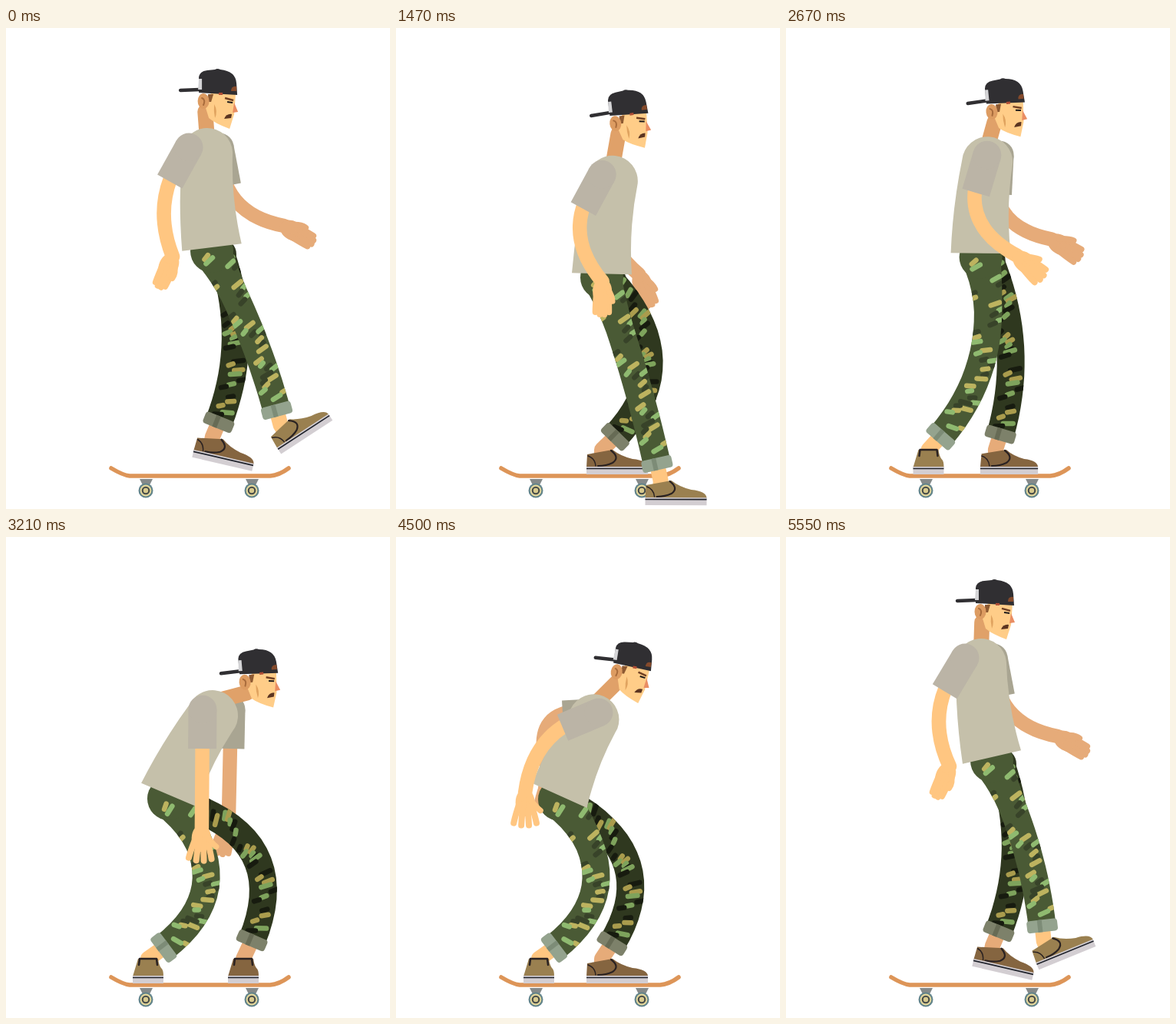
An HTML page that plays this animation: 500 by 625 pixels, repeating every 5580 ms.

```html
<!DOCTYPE html>
<html lang="en">
<head>
<meta charset="utf-8">
<title>Skater</title>
<style>
  html, body { margin: 0; width: 100%; height: 100%; overflow: hidden; background: #fff; }
  svg { display: block; width: 100vw; height: 100vh; }
</style>
</head>
<body>
<svg id="stage" viewBox="0 0 500 625"></svg>
<script>
const LOOP = 5580, STRIDE = 1150, JUMP = 2200;

// Two equal pushes, then the trick.
const track = (push, trick) => [
  ...push,
  ...push.map(([t, ...v]) => [t + STRIDE, ...v]).filter(k => k[0] < JUMP),
  ...trick
];

// time, hip x y, hem tilt, chest x y
const body = track([
  [0, 268, 290, -7, 262, 163],
  [350, 268, 325, 2, 283, 199],
  [520, 262, 321, 4, 286, 194],
  [810, 261, 292, 5, 273, 168],
  [980, 263, 315, 0, 269, 189]
], [
  [2600, 255, 297, 0, 262, 172],
  [2880, 248, 305, 6, 265, 185],
  [3210, 212, 340, 23, 269, 232],
  [3400, 210, 344, 23, 268, 238],
  [3850, 217, 262, 14, 268, 165],
  [4020, 218, 214, 9, 262, 112],
  [4150, 222, 192, 5, 255, 85],
  [4500, 213, 341, 24, 258, 236],
  [4900, 240, 310, 8, 262, 192],
  [5130, 258, 296, -2, 262, 172],
  [5550, 268, 291, -13, 254, 165]
]);

// time, x y, tilt
const head = track([
  [0, 275, 95, 0],
  [430, 309, 127, -10],
  [730, 297, 92, -16],
  [810, 294, 96, -14],
  [980, 293, 118, -8]
], [
  [2600, 285, 106, -6],
  [2880, 295, 119, -5],
  [3210, 329, 187, -5],
  [3400, 328, 193, 0],
  [3850, 333, 130, 25],
  [4020, 328, 89, 45],
  [4150, 318, 60, 40],
  [4500, 305, 178, 9],
  [4900, 290, 130, 3],
  [5550, 271, 97, 0]
]);

// time, ankle x y, angle, turn to viewer, knee bend
const nearFoot = track([
  [0, 357, 516, -33, 0, 8],
  [110, 399, 497, -38, 0, 5],
  [320, 345, 588, 0, 0, 5],
  [590, 160, 562, 40, 0, 10],
  [690, 102, 478, 105, 0, 30],
  [810, 162, 420, 133, 0, 90],
  [980, 207, 470, 58, 0, 87],
  [1070, 280, 505, 8, 0, 55]
], [
  [2450, 186, 548, 0, 1, 30],
  [3210, 185, 548, 0, 1, 62],
  [3600, 185, 548, 0, 1, 55],
  [4020, 129, 428, 81, 0, 57],
  [4150, 112, 392, 85, 0, 62],
  [4420, 186, 548, 0, 1, 60],
  [4600, 186, 548, 0, 1, 62],
  [5170, 186, 548, 0, 1, 20],
  [5400, 245, 527, 5, 0, 45],
  [5550, 335, 525, -22, 0, 12]
]);

const farFoot = track([
  [0, 269, 531, 13, 0, 24],
  [300, 268, 548, 0, 0, 55],
  [500, 268, 548, 0, 0, 58],
  [810, 268, 548, 0, 0, 16],
  [980, 268, 548, 0, 0, 59]
], [
  [2600, 268, 548, 0, 0, 22],
  [2930, 309, 548, 0, 1, 40],
  [3210, 309, 548, 0, 1, 66],
  [3600, 309, 548, 0, 1, 50],
  [4020, 394, 402, -27, 1, 40],
  [4150, 422, 372, -26, 1, 42],
  [4420, 268, 548, 0, 0, 58],
  [4600, 268, 548, 0, 0, 58],
  [5170, 268, 548, 0, 0, 22],
  [5550, 269, 531, 13, 0, 24]
]);

// time, shoulder x and wrist x y from the chest, hand angle, finger spread
const nearArm = track([
  [0, -24, -45, 134, 114, 0],
  [400, -10, 0, 130, 80, .3],
  [650, 6, 85, 100, -15, .6],
  [810, 6, 69, 114, -5, .6],
  [980, -6, -7, 124, 60, 0]
], [
  [2600, 0, 40, 122, 40, .4],
  [3210, -13, -14, 146, 93, .9],
  [3400, -10, -50, 130, 110, .8],
  [3700, 0, -125, 40, 160, .9],
  [4020, 6, -122, -30, 200, 1.1],
  [4150, 6, -128, -38, 205, 1.1],
  [4500, 6, -90, 96, 90, .9],
  [5130, -18, -50, 132, 110, .1],
  [5550, -21, -41, 133, 114, 0]
]);

const farArm = track([
  [0, 16, 100, 94, 30, .1],
  [400, 0, 10, 125, 85, .3],
  [650, -11, -100, 75, 150, .5],
  [810, -11, -92, 87, 145, .5],
  [980, -14, -63, 123, 140, .4]
], [
  [2600, 14, 85, 100, 30, .3],
  [3210, 24, 21, 138, 105, .4],
  [3400, 20, -30, 135, 115, .5],
  [3700, 10, -122, 50, 155, .9],
  [4020, 6, -124, -9, 175, 1],
  [4150, 6, -126, -15, 180, 1],
  [4500, 10, -58, 74, 100, .4],
  [5200, 14, 80, 105, 40, .2],
  [5550, 16, 100, 94, 30, .1]
]);

// time, centre x y, pitch, roll
const board = [
  [0, 252, 582, 0, 0],
  [3440, 252, 582, 0, 0],
  [3600, 250, 560, -14, 0],
  [4020, 249, 520, -15, 180],
  [4180, 250, 528, -9, 270],
  [4400, 252, 582, 0, 360],
  [4410, 252, 582, 0, 0]
];

// Cyclic cubic interpolation that never overshoots a key.
function at(keys, time) {
  const n = keys.length, around = [-1, 0, 1, 2];
  const i = keys.findLastIndex(k => k[0] <= time);
  const k = around.map(o => keys[(i + o + n) % n]);
  const t = around.map((o, j) => k[j][0] + LOOP * Math.floor((i + o) / n));
  const span = t[2] - t[1], u = (time - t[1]) / span;
  return k[1].slice(1).map((_, c) => {
    const v = k.map(key => key[c + 1]);
    const d = [0, 1, 2].map(j => (v[j + 1] - v[j]) / (t[j + 1] - t[j]));
    const slope = (a, b) => a * b <= 0 ? 0 : 2 * a * b / (a + b) * span;
    const m0 = slope(d[0], d[1]), m1 = slope(d[1], d[2]), D = v[2] - v[1];
    return v[1] + u * (m0 + u * (3 * D - 2 * m0 - m1 + u * (m0 + m1 - 2 * D)));
  });
}

const P = (x, y) => ({ x, y, toString: () => x.toFixed(1) + ' ' + y.toFixed(1) });
const mix = (a, b, u) => a + (b - a) * u;
const degrees = (a, b) => Math.atan2(b.y - a.y, b.x - a.x) * 180 / Math.PI;
const polar = (p, deg, r) => P(p.x + r * Math.cos(deg * Math.PI / 180), p.y + r * Math.sin(deg * Math.PI / 180));
const fill = (d, color) => `<path d="${d}" fill="${color}"/>`;
const line = (d, color, width, cap = 'round') =>
  `<path d="${d}" fill="none" stroke="${color}" stroke-width="${width}" stroke-linecap="${cap}" stroke-linejoin="round"/>`;
const circle = (p, r, color) => `<circle cx="${p.x}" cy="${p.y}" r="${r}" fill="${color}"/>`;
const group = (p, deg, inner, extra = '') => `<g transform="translate(${p}) rotate(${deg}) ${extra}">${inner}</g>`;

// Quadratic limb from a to b, bowed sideways by sag.
function limb(a, b, sag) {
  const dx = b.x - a.x, dy = b.y - a.y, c = Math.hypot(dx, dy);
  const k = P((a.x + b.x) / 2 + 2 * sag * dy / c, (a.y + b.y) / 2 - 2 * sag * dx / c);
  const point = (t, off = 0) => {
    const q = s => (1 - t) ** 2 * a[s] + 2 * t * (1 - t) * k[s] + t * t * b[s];
    const g = s => (1 - t) * (k[s] - a[s]) + t * (b[s] - k[s]);
    const l = Math.hypot(g('x'), g('y'));
    return P(q('x') + off * g('y') / l, q('y') - off * g('x') / l);
  };
  return { point, d: `M${a}Q${k} ${b}` };
}

function camo(seed) {
  const rnd = () => (seed = seed * 16807 % 2147483647) / 2147483647;
  return Array.from({ length: 13 }, (_, i) => {
    const t = .02 + i * .067 + rnd() * .03, off = (rnd() - .5) * 30;
    return [0, 1, 2].slice(0, 2 + (rnd() > .6)).map(j => ({
      t: t + j * .024, off: off + (rnd() - .5) * 16, len: 4 + rnd() * 9, color: (i + j) % 3
    }));
  }).flat();
}

const near = {
  id: 'near', skin: '#ffc681', sleeve: '#bbb4a6', pants: '#4a5a35', cuff: '#94a38e', fold: '#7d8c77', shoe: '#9a8050',
  hip: 28, reach: 154, camo: camo(421), camoColors: ['#bdb35f', '#8fba70', '#384329']
};
const far = {
  id: 'far', skin: '#e6ab79', sleeve: '#a9a592', pants: '#2f381f', cuff: '#7d816a', fold: '#676b55', shoe: '#856540',
  hip: 20, reach: 146, camo: camo(977), camoColors: ['#aa9c4d', '#7ea35c', '#171b0f']
};

function shoe(turn, color) {
  const m = (a, b) => mix(a, b, turn).toFixed(1), toe = m(60, 20), ink = '#2a2222';
  const trim = turn > .5
    ? line('M-12 8L-11 0H11L12 8', ink, 2.5)
    : line('M12 1Q24 10 14 17Q6 21 -5 21', ink, 2.2) + line('M-18 8Q-9 11 -8 21', ink, 1.5);
  return fill(`M-20 23L${m(-19, -13)} ${m(6, 0)}L${m(14, 13)} 0Q${m(24, 14)} 8 ${m(40, 17)} 12Q${toe} 14 ${toe} 23Z`, color)
    + trim + fill(`M-20 22H${toe}V32H-20Z`, '#d3ced2') + line(`M-20 24.5H${toe}`, '#20232c', 1.6, 'butt');
}

function leg(hip, [x, y, angle, turn, sag], look) {
  const ankle = P(x, y), curve = limb(hip, ankle, sag), end = .92;
  const width = t => 18 + (look.hip - 20) * Math.max(0, 1 - t / .3) ** 2;
  const steps = Array.from({ length: 19 }, (_, i) => i / 18 * end);
  const side = s => steps.map(t => curve.point(t, s * width(t)));
  const shape = `<path d="M${[...side(1), ...side(-1).reverse()].join('L')}Z"/>`
    + `<circle cx="${hip.x}" cy="${hip.y}" r="${look.hip}"/>`;
  const patches = look.camo.map(c => {
    const a = curve.point(c.t, c.off - c.len / 2), b = curve.point(c.t - .012, c.off + c.len / 2);
    return line(`M${a}L${b}`, look.camoColors[c.color], 6.5);
  }).join('');
  const p = curve.point(end), tilt = degrees(p, curve.point(end + .02)) - 90;
  return line(`M${p}L${ankle}L${polar(ankle, angle + 90, 5)}`, look.skin, 20, 'butt')
    + group(ankle, angle, shoe(turn, look.shoe))
    + `<clipPath id="${look.id}">${shape}</clipPath><g fill="${look.pants}">${shape}</g>`
    + `<g clip-path="url(#${look.id})">${patches}</g>`
    + group(p, tilt, `<rect x="-20" y="-8" width="40" height="16" rx="4" fill="${look.cuff}"/>`
      + `<rect x="-6" y="-8" width="6" height="16" fill="${look.fold}"/>`);
}

function hand(spread, skin) {
  const fingers = [-1.5, -.5, .5, 1.5].map(i =>
    line(`M14 ${i * 5}Q30 ${i * (5 + spread * 4)} ${44 - Math.abs(i) * 3} ${i * (4.5 + spread * 6)}`, skin, 8)).join('');
  return `<ellipse cx="13" cy="0" rx="18" ry="12.5" fill="${skin}"/>` + fingers
    + line(`M8 -6Q18 -13 ${26 - spread * 3} ${-11 - spread * 10}`, skin, 7.5);
}

function arm(chest, [sx, wx, wy, angle, spread], look) {
  const shoulder = P(chest.x + sx, chest.y - 8), wrist = P(chest.x + wx, chest.y + wy);
  const slack = look.reach - Math.hypot(wx - sx, wy + 8);
  const curve = limb(shoulder, wrist, -Math.min(44, Math.max(0, slack * 2)));
  const sleeveEnd = polar(shoulder, degrees(shoulder, curve.point(.35)), 51);
  return line(curve.d, look.skin, 18.5) + group(wrist, angle, hand(spread, look.skin))
    + line(`M${shoulder}L${sleeveEnd}`, look.sleeve, 37, 'butt') + circle(shoulder, 18.5, look.sleeve);
}

function shirt(hip, tilt, chest) {
  const hem = P(hip.x, hip.y - 5), left = polar(hem, tilt, -39), right = polar(hem, tilt, 39);
  const across = degrees(hip, chest) + 90;
  const a = polar(chest, across, -33), b = polar(chest, across, 33);
  const middle = (p, q, push) => polar(P((p.x + q.x) / 2, (p.y + q.y) / 2), across, push);
  return fill(`M${left}Q${middle(left, a, -5)} ${a}A33 33 0 0 1 ${b}Q${middle(b, right, -8)} ${right}Z`, '#c5c0aa');
}

const face =
  fill('M267 84H299L298 98L297 112L291 131Q272 124 264 117L260 104Z', '#ffcd88')
  + fill('M297 97L302 109L295 110Z', '#e98d63')
  + fill('M263 86H270L267 96H263Z', '#8d5a32')
  + '<ellipse cx="257" cy="95" rx="7.5" ry="10" fill="#dd9c62"/>'
  + line('M255 91Q260 93 257 100', '#a96c3c', 2)
  + fill('M271 99Q276 108 272 117Q270 108 271 99Z', '#e0a35f')
  + line('M285 91L296 94', '#704124', 2.5, 'butt') + line('M288 96L295 97', '#1d1a1a', 2, 'butt')
  + fill('M284 118Q287 111 294 112L293 117Z', '#5b3521')
  + fill('M251 84L251 64Q252 56 262 55L272 54Q275 52 279 54Q299 56 300 72L301 87Z', '#302f32')
  + line('M227 81L252 80', '#302f32', 4.5)
  + fill('M251 66H255V80H250Z', '#d4d4d6')
  + fill('M293 82Q293 75 300 76V82Z', '#854a2b')
  + fill('M277 84H282V87H277Z', '#b04e35');

const wheel = x => fill(`M${x - 8} 4H${x + 9}L${x + 5} 12H${x - 4}Z`, '#858a8a')
  + ['#60838b', '#e2d69b', '#444a49', '#d7c98d'].map((c, i) => circle(P(x, 19), 9.5 - 2.1 * i, c)).join('');
const deck = wheel(-70) + wheel(68) + line('M-115 -10Q-100 -1 -91 0H92Q104 -1 116 -10', '#dd9558', 5.5);

const stage = document.getElementById('stage');

function draw(time) {
  const [hx, hy, tilt, cx, cy] = at(body, time);
  const hip = P(hx, hy), chest = P(cx, cy);
  const [fx, fy, nod] = at(head, time), skull = P(fx, fy);
  const [bx, by, pitch, roll] = at(board, time);
  const nape = polar(skull, nod + 139, 21);
  stage.innerHTML =
    group(P(bx, by), pitch, deck, `scale(1 ${Math.cos(roll * Math.PI / 180)})`)
    + arm(chest, at(farArm, time), far)
    + leg(P(hx + 12, hy + 4), at(farFoot, time), far)
    + leg(hip, at(nearFoot, time), near)
    + line(`M${cx} ${cy - 18}L${nape}`, '#e0a169', 20)
    + shirt(hip, tilt, chest)
    + group(skull, nod, face, 'translate(-275 -95)')
    + arm(chest, at(nearArm, time), near);
}

const start = performance.now();
function tick() {
  draw((performance.now() - start) % LOOP);
  requestAnimationFrame(tick);
}
tick();
</script>
</body>
</html>
```
